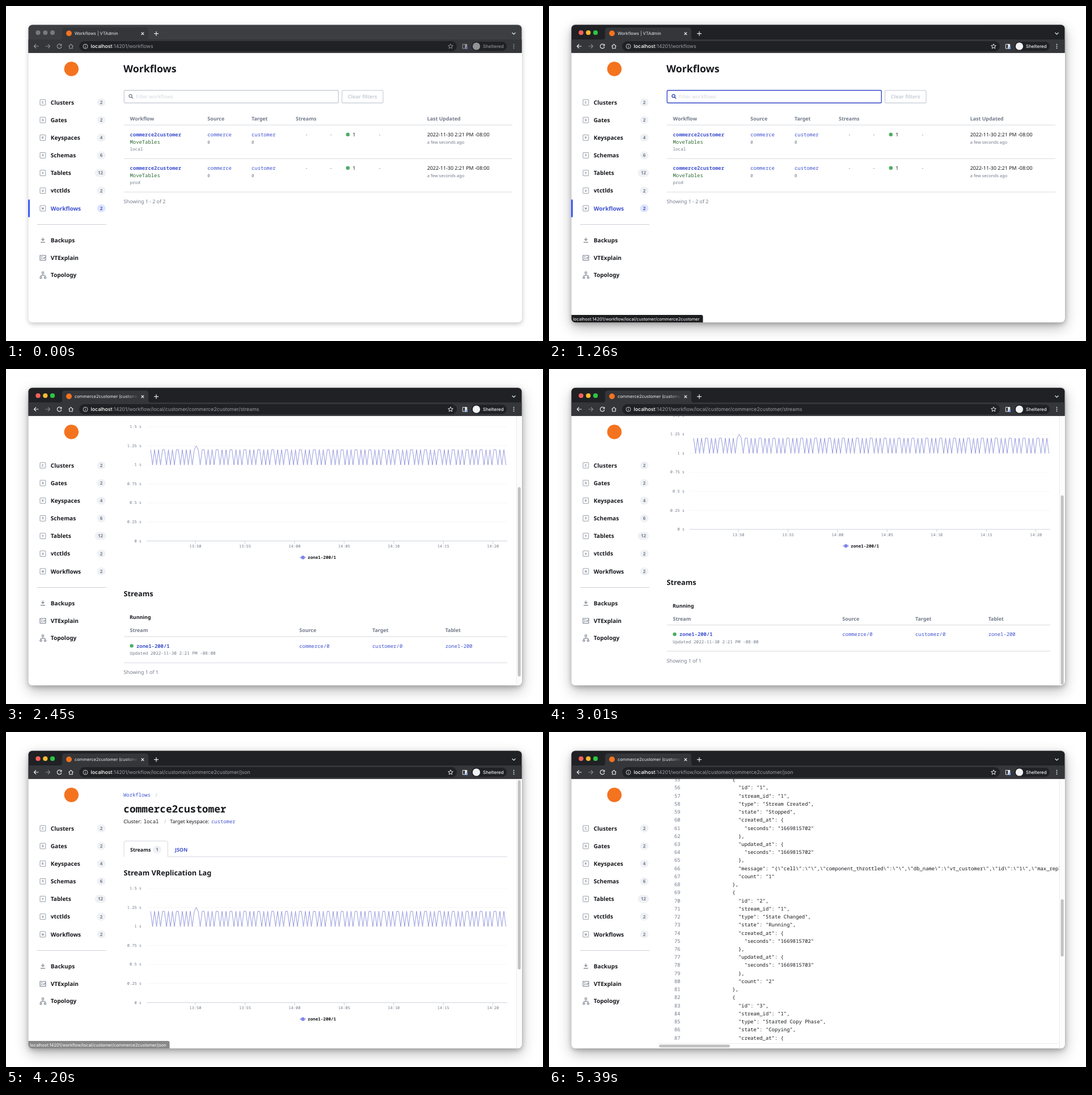
Recreate the animation shown at these times as an HTML page. Size 947 px wide and 591 px high, loop 6370 ms.

```html
<!DOCTYPE html>
<html lang="en">
<head>
<meta charset="utf-8">
<title>Workflow browser</title>
<style>
  html, body { margin: 0; width: 100%; height: 100%; overflow: hidden; background: #fff; }
  svg, .shadow { position: absolute; }
  svg { left: 0; top: 0; }
  .shadow { left: 39.5px; top: 33.3px; width: 870px; height: 525px; border-radius: 7px; }
  .idle-shadow { box-shadow: 0 3px 9px rgba(0,0,0,.24), 0 0 1px rgba(0,0,0,.2); }
  .live-shadow { box-shadow: 0 9px 24px rgba(0,0,0,.28), 0 0 1px rgba(0,0,0,.2); }
  text { white-space: pre; text-rendering: geometricPrecision; }
  .sans { font-family: "Noto Sans", sans-serif; }
  .mono { font-family: "Noto Sans Mono", monospace; }
  .ui { font-family: Inter, sans-serif; }

  /* One loop is 6370 ms, so 1% is 63.7 ms. */
  .live-shadow, .live, .dim, .list, .detail, .streams, .json, .url-streams, .url-json, .caret, .json-label {
    animation: 6.37s step-end infinite;
  }
  .live-shadow, .live { animation-name: wake; }
  .dim { animation-name: brighten; }
  .list { animation-name: list; }
  .detail { animation-name: detail; }
  .streams { animation-name: streams; }
  .json { animation-name: json; }
  .url-streams { animation-name: url-streams; }
  .url-json { animation-name: url-json; }
  .caret { animation-name: caret; }
  .json-label { animation-name: json-hover; }
  .json-active { animation: json-settle 6.37s linear infinite; }
  .focus { animation: focus 6.37s linear infinite; }
  .hint-1 { animation: hint-1 6.37s linear infinite; }
  .hint-2 { animation: hint-2 6.37s linear infinite; }
  .scroll-streams { animation: scroll-streams 6.37s linear infinite; }
  .scroll-json { animation: scroll-json 6.37s linear infinite; }

  @keyframes wake { from { opacity: 0 } 1.09%, to { opacity: 1 } }
  @keyframes brighten { from { opacity: .55 } 1.09%, to { opacity: 1 } }
  @keyframes list { from { visibility: visible } 20.87%, to { visibility: hidden } }
  @keyframes detail { from { visibility: hidden } 20.87%, to { visibility: visible } }
  @keyframes streams { from { visibility: hidden } 20.87% { visibility: visible } 67.02%, to { visibility: hidden } }
  @keyframes json { from { visibility: hidden } 67.02%, to { visibility: visible } }
  @keyframes url-streams { from { visibility: hidden } 20.87% { visibility: visible } 65.92%, to { visibility: hidden } }
  @keyframes url-json { from { visibility: hidden } 65.92%, to { visibility: visible } }
  @keyframes caret { from { opacity: 0 } 4.39% { opacity: 1 } 12.08%, to { opacity: 0 } }
  @keyframes json-hover { from { fill: #727b8a } 63.73%, to { fill: #3f52cf } }
  @keyframes json-settle { from, 70.3% { fill: #3f52cf } 72.5%, to { fill: #17191d } }
  @keyframes focus { from, 3.3% { opacity: 0 } 5.5%, to { opacity: 1 } }
  @keyframes hint-1 { from, 14.27% { opacity: 0 } 14.28% { opacity: .5 } 15.38%, 28.57% { opacity: 1 } 31.87%, to { opacity: 0 } }
  @keyframes hint-2 { from, 65.92% { opacity: 0 } 65.93% { opacity: .52 } 67.03%, 75.82% { opacity: 1 } 81.3%, to { opacity: 0 } }
  @keyframes scroll-streams {
    from { transform: none }
    34.07% { transform: translateY(0); animation-timing-function: cubic-bezier(.35,.2,.4,1) }
    40.66% { transform: translateY(var(--d)) }
    47.25% { transform: translateY(var(--d)); animation-timing-function: cubic-bezier(.4,.1,.4,1) }
    54.95%, to { transform: translateY(0) }
  }
  @keyframes scroll-json {
    from, 74.73% { transform: translateY(0) }
    76.92% { transform: translateY(calc(var(--d) * .0118)); animation-timing-function: cubic-bezier(.4,.1,.4,1) }
    84.62%, to { transform: translateY(var(--d)) }
  }
</style>
</head>
<body>
<div class="shadow idle-shadow"></div>
<div class="shadow live-shadow"></div>
<svg id="stage" width="947" height="591" viewBox="0 0 947 591"></svg>
<script>
const INK = '#17191d', GRAY = '#727b8a', LINK = '#3f52cf', GREEN = '#2f6b35';
const EM = 8.89;

// Text is placed by the middle of its capitals.
const text = (x, y, str, { size = EM, fill = INK, weight = 400, font = 'sans', anchor = 'start', cls = '' } = {}) => {
  const safe = str.replace(/&/g, '&amp;').replace(/</g, '&lt;');
  return `<text class="${font} ${cls}" x="${x}" y="${(y + size * .36).toFixed(2)}" font-size="${size}" font-weight="${weight}" fill="${fill}" text-anchor="${anchor}">${safe}</text>`;
};
const mono = (x, y, str, opts) => text(x, y, str, { font: 'mono', ...opts });
const ui = (x, y, str, opts) => text(x, y, str, { font: 'ui', size: 8.75, fill: '#e8eaed', ...opts });
const rect = (x, y, w, h, fill, r = 0, extra = '') =>
  `<rect x="${x}" y="${y}" width="${w}" height="${h}" rx="${r}" fill="${fill}" ${extra}/>`;
const dot = (x, y, r, fill) => `<circle cx="${x}" cy="${y}" r="${r}" fill="${fill}"/>`;
const path = (d, stroke, width = 1, extra = '') =>
  `<path d="${d}" fill="none" stroke="${stroke}" stroke-width="${width}" ${extra}/>`;
const shape = (d, fill) => `<path d="${d}" fill="${fill}"/>`;
const rule = (x1, x2, y, color = '#d5d9df') => path(`M${x1} ${y}H${x2}`, color);
const group = (cls, ...parts) => `<g class="${cls}">${parts.flat().join('')}</g>`;
const pill = (x, y, label, on) => {
  const [w, cx] = label.length > 1 ? [20, x - 2] : [15, x - .5];
  return rect(cx - w / 2, y - 7, w, 14, on ? '#dfe5fb' : '#eff1f5', 7) +
    text(cx, y, label, { size: 8, weight: 600, fill: on ? LINK : GRAY, anchor: 'middle' });
};

function browserChrome() {
  const white = '#e8eaed', site = 'localhost', base = ':14201/workflow';
  const url = (cls, rest) => group(cls,
    `<text class="ui" x="149.5" y="74.2" font-size="8.75" fill="#9aa0a6"><tspan fill="#fff" font-weight="500">${site}</tspan>${base}${rest}</text>`);
  return [
    rect(39, 33, 871, 49.7, '#3c3e41'),
    group('live', rect(39, 33, 871, 26, '#202124')),
    rect(39, 59, 871, 23.7, '#35363a'),
    shape('M95 59Q99 59 99 55V43Q99 38 104 38H246Q251 38 251 43V55Q251 59 255 59Z', '#35363a'),
    [56.5, 69.3, 82].map((x, i) => dot(x, 47, 4, '#77797c') + group('live', dot(x, 47, 4, ['#ff5f57', '#febc2e', '#28c840'][i]))),
    dot(111, 48.3, 5, '#f4731f'),
    group('list', ui(121, 48.5, 'Workflows | VTAdmin', { size: 7.55 })),
    group('detail', ui(121, 48.5, 'commerce2customer (custome', { size: 7.55, fill: 'url(#tabFade)' })),
    path('M238.6 46.4l4.6 4.6m0-4.6l-4.6 4.6M261 48.7h8m-4-4v8', white, 1.2),
    path('M892.5 47l3 3 3-3', white, 1.2),
    rect(129, 62, 666, 18, '#202124', 9),
    rect(821, 63, 62, 16, '#202124', 8),
    group('dim',
      path('M57.5 71h-8m3.5-3.5L49.5 71l3.5 3.5', white, 1.2),
      path('M97 68.5A3.8 3.8 0 1 0 97.8 72M97.8 67v3h-3', white, 1.2),
      path('M110.5 71.2l4-3.7 4 3.7M111.8 70.5v4.2h5.4v-4.2', white, 1.1),
      path('M784 66.8l1.2 2.9 3.1.2-2.4 2 .8 3-2.7-1.6-2.7 1.6.8-3-2.4-2 3.1-.2Z', white),
      path('M805.3 67.5h7.5v7.5h-7.5Z', white), rect(809.3, 67.5, 3.5, 7.5, white), rect(811, 72, 3, 4, '#7baaf7'),
      dot(829.5, 71, 6.6, '#f1f3f4'),
      ui(841, 71.2, 'Sheltered', { size: 8, weight: 500 }),
      [67.7, 71, 74.3].map(y => dot(895.5, y, .95, white))),
    path('M69.5 71h8m-3.5-3.5l3.5 3.5-3.5 3.5', '#85888c', 1.1),
    `<circle cx="140" cy="71.2" r="4" fill="none" stroke="#c5c8cc"/>` + path('M140 70.5v3m0-5v1', '#c5c8cc'),
    url('list', 's'),
    url('url-streams', '/local/customer/commerce2customer/streams'),
    url('url-json', '/local/customer/commerce2customer/json'),
  ];
}

function sidebar() {
  const counts = { Clusters: 2, Gates: 2, Keyspaces: 4, Schemas: 6, Tablets: 12, vtctlds: 2, Workflows: 2 };
  const label = (y, name, fill = INK) => text(78.8, y, name, { size: 10.1, weight: 600, fill });
  const items = Object.entries(counts).map(([name, n], i) => {
    const y = 170 + i * 31.15;
    // The chosen page tints its own label and count.
    const entry = label(y, name) + pill(168.5, y, String(n));
    return rect(60, y - 4.9, 9.8, 9.8, 'none', .6, 'stroke="#8a92a0" stroke-width=".9"') +
      mono(64.9, y, name[0].toUpperCase(), { size: 5.6, weight: 600, fill: GRAY, anchor: 'middle' }) +
      (name === 'Workflows'
        ? group('detail', entry) + group('list', label(y, name, LINK), pill(168.5, y, String(n), true), rect(39, 341.5, 3, 31, '#3d5afe'))
        : entry);
  });
  return [
    dot(115.3, 111, 12.7, '#f4731f'),
    items,
    rule(55, 177, 385.5, '#cbd0d7'),
    label(413.7, 'Backups'), label(444.3, 'VTExplain'), label(474.8, 'Topology'),
    path('M65 408.5v5m-2.6-2.3l2.6 2.6 2.6-2.6M61 416.9h8', GRAY, 1.1),
    path('M60 440h10v8.5H60ZM61.8 442.7h2.7m-2.7 2.8h2.7M65.8 444.2l1.2 1.2 2.2-2.5', GRAY, 1.1),
    path('M65 472.5v2.7M61.5 478v-2.8h7.5V478M63.5 469h3v3h-3ZM60 478h3v2.5h-3ZM67.5 478h3v2.5h-3Z', GRAY, 1),
  ];
}

function listPage() {
  const head = (x, s) => text(x, 198.8, s, { weight: 600, fill: GRAY });
  const row = (y, cluster) => [
    mono(218.5, y, 'commerce2customer', { weight: 700, fill: LINK }),
    mono(218.5, y + 12.6, 'MoveTables', { fill: GREEN }),
    mono(218.5, y + 25.6, cluster, { size: 7.6, fill: GRAY }),
    mono(355.3, y, 'commerce', { fill: LINK }), mono(433, y, 'customer', { fill: LINK }),
    mono(355.3, y + 12.8, '0', { size: 7.6, fill: GRAY }), mono(433, y + 12.8, '0', { size: 7.6, fill: GRAY }),
    [530, 573, 659].map(x => text(x, y, '-', { fill: GRAY, anchor: 'middle' })),
    dot(602.8, y - .3, 3.3, '#4cae65'), text(611.3, y, '1'),
    text(742.7, y, '2022-11-30 2:21 PM -08:00'),
    text(742.7, y + 12.8, 'a few seconds ago', { size: 7.6, fill: GRAY }),
    rule(208, 893, y + 42.2),
  ].flat();
  const search = color => rect(208.3, 148.8, 378, 22.2, 'none', 2, `stroke="${color}" stroke-width="1.4"`);
  const lens = color => `<circle cx="219.6" cy="158.8" r="2.6" fill="none" stroke="${color}" stroke-width="1.2"/>` + path('M221.5 160.8l2.6 2.6', color, 1.3);
  return [
    text(207, 111, 'Workflows', { size: 17.7, weight: 700 }),
    search('#c9ced6'), lens(GRAY),
    group('focus', search(LINK), lens(LINK)),
    text(229, 160, 'Filter workflows', { fill: '#d3d7de' }),
    group('caret', rect(229.6, 154, 1, 12, INK)),
    rect(592.5, 148.8, 72.5, 22.2, 'none', 2, 'stroke="#cdd2da" stroke-width="1.3"'),
    text(628.7, 160, 'Clear filters', { weight: 600, fill: '#c9ced7', anchor: 'middle' }),
    head(218.5, 'Workflow'), head(355.3, 'Source'), head(433, 'Target'), head(511, 'Streams'), head(742.7, 'Last Updated'),
    rule(208, 893, 210),
    row(227, 'local'), row(286, 'prod'),
    text(207.6, 345, 'Showing 1 - 2 of 2', { fill: GRAY }),
  ].flat();
}

function detailHeader(jsonActive) {
  const [x1, x2] = jsonActive ? [287.5, 332.8] : [208, 285.3];
  return [
    mono(207, 111, 'Workflows', { fill: LINK }), text(263.5, 111, '/', { fill: '#b0b7c3' }),
    mono(207.3, 136, 'commerce2customer', { size: 17.78, weight: 600 }),
    text(207.2, 157.5, 'Cluster:'), mono(242.7, 157.5, 'local'),
    text(279, 157.5, '/', { fill: '#b0b7c3' }),
    text(289.2, 157.5, 'Target keyspace:'), mono(362, 157.5, 'customer', { fill: LINK }),
    path(`M208 220H${x1}V195Q${x1} 192.3 ${x1 + 3} 192.3H${x2 - 3}Q${x2} 192.3 ${x2} 195V220H884`, '#d3d7de'),
    text(219, 207.3, 'Streams', { weight: 600, fill: jsonActive ? GRAY : INK }), pill(267, 207.5, '1'),
    text(298, 207.3, 'JSON', { weight: 600, fill: GRAY, cls: jsonActive ? 'json-active' : 'json-label' }),
  ];
}

function lagChart() {
  const yOf = seconds => 477.3 - seconds * 134.2;
  // Lag flips each sample with a doubled crest every seventh; the spike skips one beat.
  const spike = 23;
  const lag = i => i === spike ? 1.25 : (i < spike - 2 ? i : i + 1) % 7 % 2 ? 1 : 1.2;
  const points = Array.from({ length: 180 }, (_, i) => `${(255 + i * 3.5).toFixed(1)} ${yOf(lag(i)).toFixed(1)}`);
  const small = { size: 7, fill: GRAY };
  return [
    ['0', '0.25', '0.5', '0.75', '1', '1.25', '1.5'].map((v, i) =>
      rule(248, 884, yOf(+v), i ? '#f6f6f8' : '#ccd1da') + mono(239, yOf(+v) - .3, v + ' s', { ...small, anchor: 'end' })),
    ['13:50', '13:55', '14:00', '14:05', '14:10', '14:15', '14:20'].map((v, i) => {
      const x = 334 + i * 87.45;
      return path(`M${x} 477.3v5`, '#ccd1da') + mono(x, 486.5, v, { ...small, anchor: 'middle' });
    }),
    path('M' + points.join('L'), '#8489d8', .85, 'stroke-linejoin="round"'),
    path('M518 506.5h11', '#7f86ea', 1.2), dot(523.6, 506.5, 3.2, '#7f86ea'),
    mono(532, 506.5, 'zone1-200/1', { size: 7.6, weight: 600 }),
  ].flat();
}

function streamsPage() {
  const head = (x, s) => text(x, 634.8, s, { weight: 600, fill: GRAY });
  return [
    detailHeader(false),
    text(207.6, 248, 'Stream VReplication Lag', { size: 12.7, weight: 700 }),
    lagChart(),
    text(207.6, 570.5, 'Streams', { size: 12.7, weight: 700 }),
    text(218, 612, 'Running', { weight: 600 }),
    head(218.5, 'Stream'), head(517.3, 'Source'), head(646, 'Target'), head(774.7, 'Tablet'),
    rule(208, 884, 646),
    dot(221.6, 662.3, 3.2, '#4cae65'),
    mono(230, 662.5, 'zone1-200/1', { weight: 700, fill: LINK }),
    mono(218.3, 675.5, 'Updated 2022-11-30 2:21 PM -08:00', { size: 7.65, fill: GRAY }),
    mono(517.3, 662.5, 'commerce/0', { fill: LINK }), mono(646, 662.5, 'customer/0', { fill: LINK }), mono(774.7, 662.5, 'zone1-200', { fill: LINK }),
    rule(208, 884, 692.3),
    text(207.6, 709, 'Showing 1 of 1', { fill: GRAY }),
  ].flat();
}

function workflowLines() {
  const created = 1669815702;
  const at = n => ({ seconds: String(n) });
  const log = (id, type, state, updated, count, message) => ({
    id, stream_id: '1', type, state, created_at: at(created + (id > 2)), updated_at: at(updated), message, count,
  });
  const copyRule = match => ({ match, filter: 'select * from ' + match });
  const message = JSON.stringify({ cell: '', component_throttled: '', db_name: 'vt_customer', id: '1', max_replication_lag: '0' });
  const stream = {
    id: '1', shard: '0', tablet: { cell: 'zone1', uid: 200 },
    binlog_source: { keyspace: 'commerce', shard: '0', filter: { rules: [copyRule('customer'), copyRule('corder')] } },
    position: '', state: 'Running', db_name: 'vt_customer',
    transaction_timestamp: at(1669846857), message: '',
    logs: [
      log('1', 'Stream Created', 'Stopped', created, '1', message),
      log('2', 'State Changed', 'Running', created + 1, '2'),
      log('3', 'Started Copy Phase', 'Copying', created + 1, '1'),
    ],
  };
  return JSON.stringify({
    cluster: { id: 'local', name: 'local' },
    keyspace: 'customer',
    workflow: {
      name: 'commerce2customer',
      source: { keyspace: 'commerce', shards: ['0'] },
      target: { keyspace: 'customer', shards: ['0'] },
      max_v_replication_lag: '1',
      shard_streams: { '0/zone1-0000000200': { streams: [stream] } },
    },
  }, null, 2).split('\n');
}

const jsonPage = () => [
  ...detailHeader(true),
  ...workflowLines().map((line, i) => {
    const y = 232.2 + i * 14.23;
    return mono(231.7, y, String(i), { fill: GRAY, anchor: 'end' }) + mono(248.8, y, line);
  }),
];

const scroller = (kind, distance, ...parts) => `<g class="scroll-${kind}" style="--d:${distance}px">${parts.flat().join('')}</g>`;
const thumb = (y, h) => rect(902.6, y, 5, h, '#c1c1c1', 2.5);
const track = rect(900, 83, 10, 476, '#fcfcfc') + path('M900.5 83V559', '#ececec');
const hint = (cls, right, page) => group(cls,
  shape(`M39 545H${right - 3}Q${right} 545 ${right} 548V559H39Z`, '#1d1e20'),
  ui(42.3, 552, 'localhost:14201/workflow/local/customer/commerce2customer' + page, { size: 7.5, fill: '#fff' }));

document.getElementById('stage').innerHTML = `
  <defs>
    <linearGradient id="tabFade" gradientUnits="userSpaceOnUse" x1="212" x2="233" y1="0" y2="0">
      <stop stop-color="#e8eaed"/><stop offset="1" stop-color="#e8eaed" stop-opacity="0"/>
    </linearGradient>
    <clipPath id="window">${rect(39.5, 33.3, 870, 525, '#000', 7)}</clipPath>
    <clipPath id="view">${rect(192, 82.7, 718, 476, '#000')}</clipPath>
    <clipPath id="code">${rect(192, 82.7, 708, 466.5, '#000')}</clipPath>
  </defs>
  <g clip-path="url(#window)">
    ${rect(39, 33, 871, 526, '#fff')}
    ${browserChrome().flat().join('')}
    ${sidebar().flat().join('')}
    ${group('list', listPage())}
    <g class="streams" clip-path="url(#view)">
      ${scroller('streams', -194.5, streamsPage())}
      ${track}${scroller('streams', 138, thumb(85, 334))}
    </g>
    <g class="json">
      <g clip-path="url(#code)">${scroller('json', -930.9, jsonPage())}</g>
      ${track}${scroller('json', 210, thumb(85, 101))}
      ${rule(192, 900, 549.5, '#ececec')}${rect(194, 551.5, 125, 5, '#c1c1c1', 2.5)}
    </g>
    ${hint('hint-1', 271.5, '')}
    ${hint('hint-2', 288.5, '/json')}
  </g>`;
</script>
</body>
</html>
```
